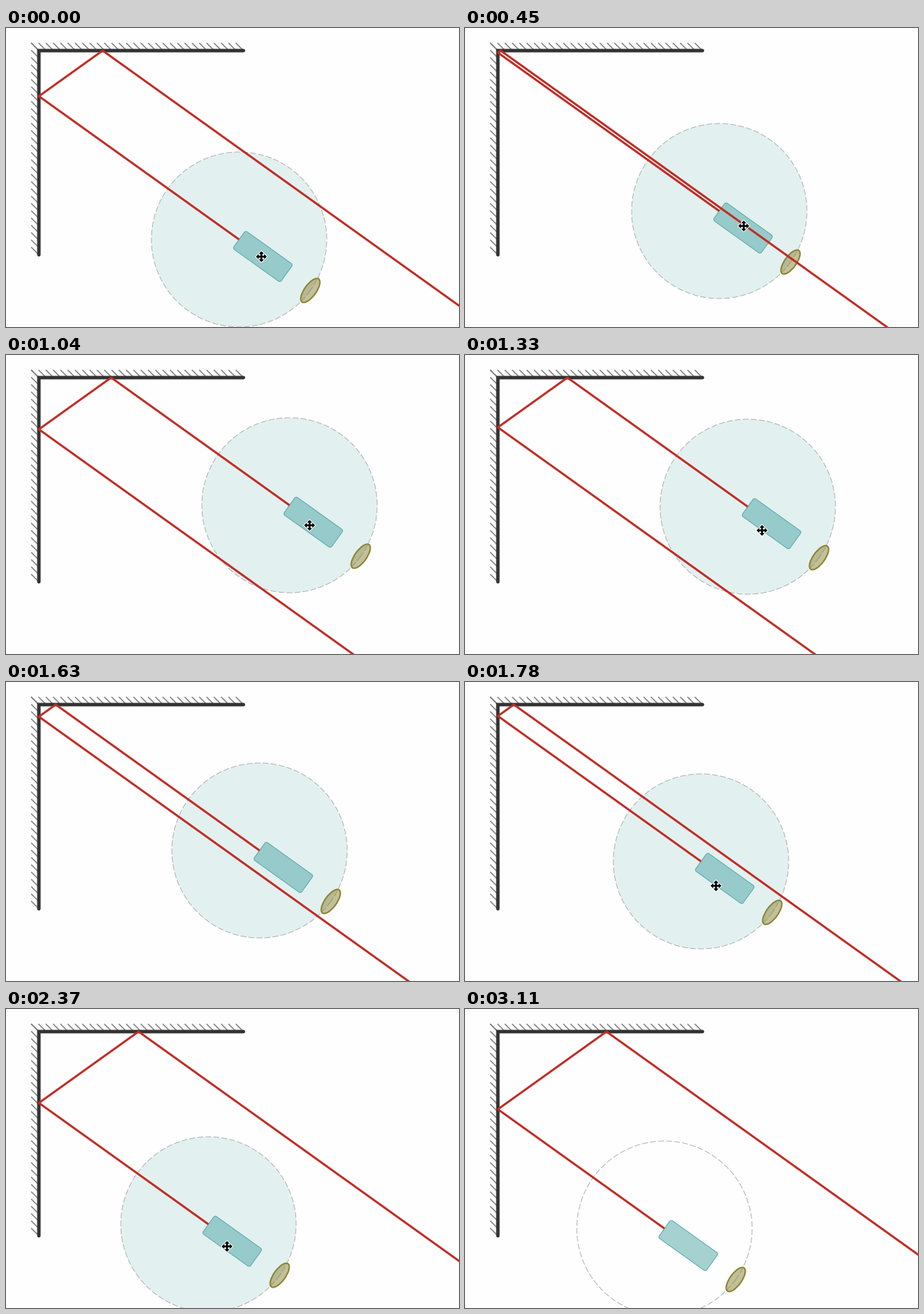
Animation, 620 px wide and 410 px high, one loop 4570 ms. Source, as a matplotlib script:

```python
import math

import matplotlib.pyplot as plt
import numpy as np
from matplotlib.animation import FuncAnimation
from matplotlib.patches import Circle, Ellipse, FancyBboxPatch, Polygon
from matplotlib.patheffects import Normal, withStroke
from matplotlib.transforms import Affine2D

WIDTH, HEIGHT, DPI = 620, 410, 80
PX = 72 / DPI  # one pixel in points
LOOP_MS, STEPS = 4570, 31

SLOPE = 0.717
TILT = math.atan(SLOPE)
CORNER_X, CORNER_Y = 45, 31
WALL_LENGTH, HATCH_SIZE = 280, 10
RADIUS = 120

PAPER, WALL, HATCH = "#fefefe", "#333333", "#808080"
TEAL, TEAL_EDGE = "#4da6a6", "#62adb0"
OLIVE, DASH, BEAM = "#8a8434", "#b2b2b2", "#c02c24"

# Key poses of the drag: step, laser x, laser y
KEYS = np.array([
    (0, 319, 290), (3, 348, 251), (5, 371, 224), (7, 388, 206), (8, 388, 206),
    (9, 387, 208), (11, 347, 231), (12, 323, 246), (14, 298, 269),
    (17, 273, 301),
], dtype=float)
KEY_STEPS, KEY_POINTS = KEYS[:, 0], KEYS[:, 1:]
KEY_SPEEDS = np.gradient(KEY_POINTS, KEY_STEPS, axis=0)
KEY_SPEEDS[[0, -1]] = 0  # the drag starts and ends at rest
RELEASE_STEP = KEY_STEPS[-1]

GRIP = np.array([27, 27])
POINTER_LEAD = 0.5  # the laser lags half a step behind the pointer
POINTER_GONE_STEP = 21
POINTER_BLINKS = (8, 11)


def laser_at(step):
    """Cubic Hermite curve through the key poses."""
    step = min(step, RELEASE_STEP)
    i = min(np.searchsorted(KEY_STEPS, step, side="right"), len(KEYS) - 1) - 1
    span = KEY_STEPS[i + 1] - KEY_STEPS[i]
    t = (step - KEY_STEPS[i]) / span
    blend = t * t * (3 - 2 * t)
    return ((1 - blend) * KEY_POINTS[i] + blend * KEY_POINTS[i + 1]
            + span * t * (1 - t) * ((1 - t) * KEY_SPEEDS[i]
                                    - t * KEY_SPEEDS[i + 1]))


def beam_path(x, y):
    """Beam from (x, y) towards the corner, off both mirrors and away."""
    wall_y = y - SLOPE * (x - CORNER_X)
    if wall_y > CORNER_Y:
        hits = [(CORNER_X, wall_y),
                (CORNER_X + (wall_y - CORNER_Y) / SLOPE, CORNER_Y)]
    else:
        top_x = x - (y - CORNER_Y) / SLOPE
        hits = [(top_x, CORNER_Y),
                (CORNER_X, CORNER_Y + SLOPE * (top_x - CORNER_X))]
    end_x, end_y = hits[-1]
    return np.array([(x, y), *hits, (end_x + 900, end_y + 900 * SLOPE)])


def pointer_shape():
    arm = np.array([(1, -1), (1, -4), (3.2, -4), (0, -7.2),
                    (-3.2, -4), (-1, -4)])
    quarter_turn = np.array([(0, -1), (1, 0)])
    return np.vstack([arm @ np.linalg.matrix_power(quarter_turn, k)
                      for k in range(4)])


def draw_hatch(x, y):
    ax.plot([x - HATCH_SIZE, x], [y - HATCH_SIZE, y],
            color=HATCH, lw=1.5 * PX, zorder=1)


fig = plt.figure(figsize=(WIDTH / DPI, HEIGHT / DPI), dpi=DPI, facecolor=PAPER)
ax = fig.add_axes([0, 0, 1, 1])
ax.set(xlim=(0, WIDTH), ylim=(HEIGHT, 0))
ax.axis("off")

# Mirrors with hatched backs
for offset in range(0, WALL_LENGTH + 1, HATCH_SIZE):
    draw_hatch(CORNER_X + offset, CORNER_Y)
    draw_hatch(CORNER_X, CORNER_Y + offset)
ax.plot([CORNER_X + WALL_LENGTH, CORNER_X, CORNER_X],
        [CORNER_Y, CORNER_Y, CORNER_Y + WALL_LENGTH], color=WALL, lw=4.8 * PX,
        solid_capstyle="round", solid_joinstyle="miter", snap=False, zorder=2)

# Laser, handle and detector share one local frame: origin at the beam's start
pose = Affine2D()
local = pose + ax.transData

halo = Circle((0, 0), RADIUS, fc=TEAL, alpha=0.15, lw=0,
              transform=local, zorder=3)
angles = np.linspace(0, 2 * np.pi, 241)
ax.plot(RADIUS * np.cos(angles), RADIUS * np.sin(angles), color=DASH,
        lw=PX, dashes=(8, 3), transform=local, zorder=4)
body_fill, body_edge = (
    FancyBboxPatch((0, -15), 80, 30, boxstyle="round,pad=0,rounding_size=3",
                   transform=local, zorder=5, **style)
    for style in (dict(fc=TEAL, alpha=0.5, lw=0),
                  dict(fc="none", ec=TEAL_EDGE, lw=1.1 * PX)))
eye_fill, eye_edge = (
    Ellipse((RADIUS, 0), 16, 39, transform=local, zorder=6, **style)
    for style in (dict(fc=OLIVE, alpha=0.5, lw=0),
                  dict(fc="none", ec=OLIVE, lw=2 * PX)))
for patch in (halo, body_fill, body_edge, eye_fill, eye_edge):
    ax.add_artist(patch)

beam, = ax.plot([], [], color=BEAM, lw=2.9 * PX, solid_capstyle="butt",
                solid_joinstyle="round", zorder=7)

POINTER = pointer_shape()
pointer = Polygon(POINTER, fc="black", lw=0, zorder=8)
pointer.set_path_effects([withStroke(linewidth=2.2 * PX, foreground="white"),
                          Normal()])
ax.add_artist(pointer)


def draw(step):
    laser = laser_at(step)
    pose.clear().rotate(TILT).translate(*laser)
    beam.set_data(*beam_path(*laser).T)
    halo.set_visible(step < RELEASE_STEP)
    lead = POINTER_LEAD * (laser_at(step + 1) - laser)
    pointer.set_xy(POINTER + np.round(laser + GRIP + lead) + 0.5)
    pointer.set_visible(step < POINTER_GONE_STEP
                        and step not in POINTER_BLINKS)
    return halo, beam, pointer


animation = FuncAnimation(fig, draw, frames=STEPS, interval=LOOP_MS / STEPS,
                          repeat=True, repeat_delay=0, blit=False)
plt.show()
```
